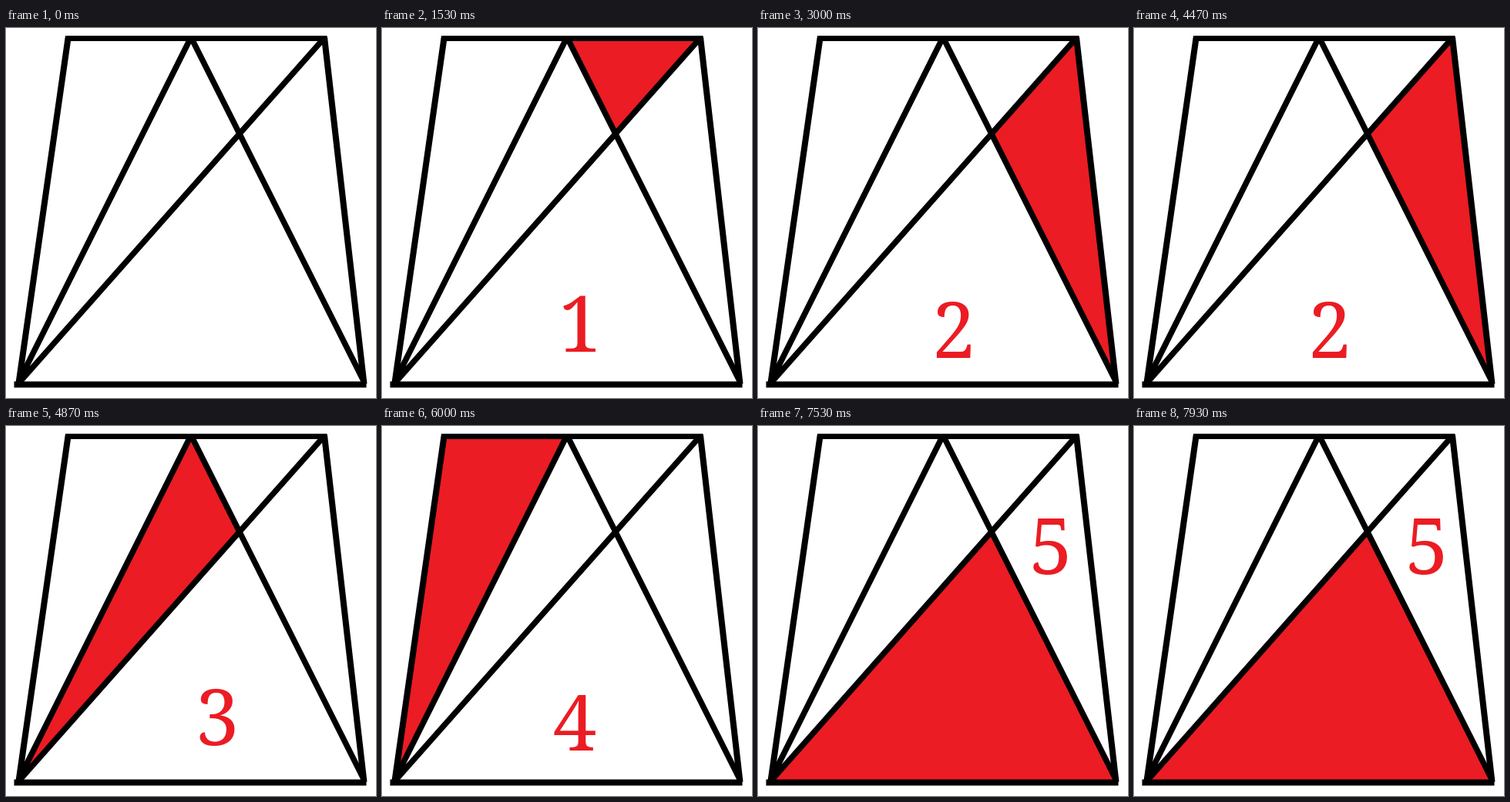
An HTML page that plays this animation: 480x480 px, repeating every 8000 ms.

```html
<!DOCTYPE html>
<html lang="en">
<head>
<meta charset="utf-8">
<style>
  html, body { margin: 0; width: 100%; height: 100%; overflow: hidden; background: #fff; }
  svg { display: block; width: 100vw; height: 100vh; }
  text { font: 101px "Noto Serif", "Liberation Serif", serif; text-anchor: middle; }
</style>
</head>
<body>
<svg viewBox="0 0 480 480">
  <g fill="#eb1c23">
    <polygon id="area"/>
    <text id="digit"></text>
  </g>
  <g fill="none" stroke="#000">
    <path stroke-width="7" d="M77 13.4H416.5"/>
    <path stroke-width="8" d="M10.5 462.6H467.5M80.7 12L16.3 462M413 12L464.5 462"/>
    <path stroke-width="7.5" d="M239 14L17 458M241 14L464 458M412 14L18 459"/>
  </g>
</svg>
<script>
  const LOOP = 8000;
  const topLeft = [81, 14], apex = [240, 14], topRight = [412, 14];
  const cross = [302.5, 137], left = [18, 459], right = [464, 459];

  // Each highlight holds until the next one begins.
  const steps = [
    { at: 0, label: "", x: 0, y: 0, points: [] },
    { at: 1530, label: "1", x: 257, y: 420, points: [apex, topRight, cross] },
    { at: 3000, label: "2", x: 254, y: 428, points: [topRight, right, cross] },
    { at: 4530, label: "3", x: 274, y: 414, points: [apex, cross, left] },
    { at: 6000, label: "4", x: 250, y: 421, points: [topLeft, apex, left] },
    { at: 7530, label: "5", x: 380, y: 192, points: [cross, right, left] }
  ];

  const area = document.getElementById("area");
  const digit = document.getElementById("digit");
  let shown;

  function show(step) {
    area.setAttribute("points", step.points.join(" "));
    digit.textContent = step.label;
    digit.setAttribute("x", step.x);
    digit.setAttribute("y", step.y);
    shown = step;
  }

  function draw() {
    const time = performance.now() % LOOP;
    const step = steps.findLast(s => s.at <= time);
    if (step !== shown) show(step);
    requestAnimationFrame(draw);
  }
  draw();
</script>
</body>
</html>
```
